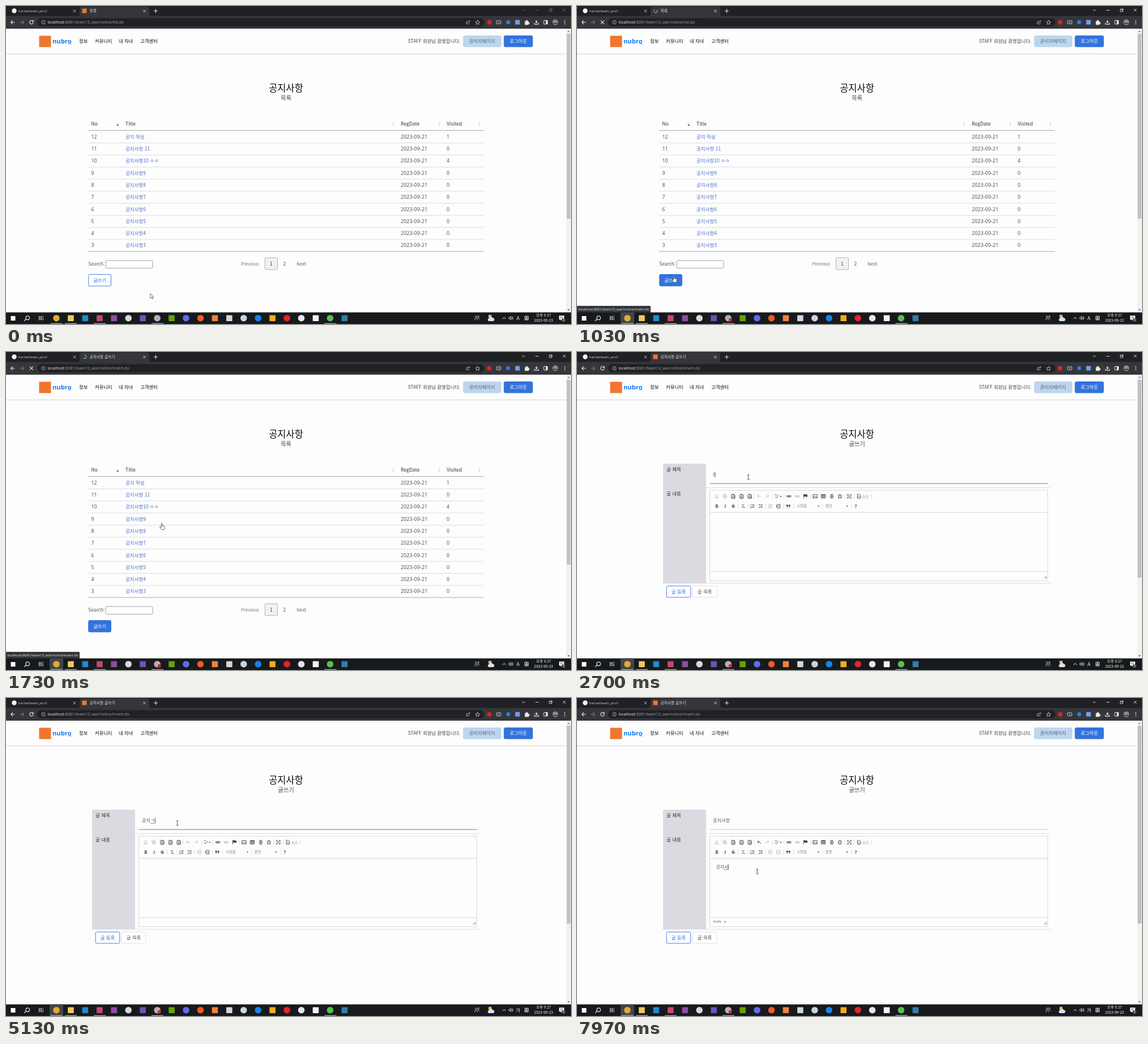
Write an HTML page that moves like this. It is 998 by 561 pixels and loops after 8000 ms.

```html
<!DOCTYPE html>
<html lang="ko">
<head>
<meta charset="utf-8">
<title>공지사항</title>
<style>
html, body { margin: 0; width: 100%; height: 100%; overflow: hidden; background: #fdfdfe; }
svg { display: block; width: 998px; height: 561px; }
text { font-family: 'Noto Sans CJK KR', 'Noto Sans', sans-serif; white-space: pre; }
.ui { font-family: 'Open Sans', 'Noto Sans CJK KR', sans-serif; }
.num { font-family: 'Noto Sans', sans-serif; }
</style>
</head>
<body>
<svg id="stage" viewBox="0 0 998 561"></svg>
<script>
const BLUE = '#3273dc', INK = '#474747', PALE = '#bdbdbd', BRAND = '#f0762f';
const LOOP = 8000;

// Drawing helpers
const rect = (x, y, w, h, fill, more = '') =>
  `<rect x="${x}" y="${y}" width="${w}" height="${h}" fill="${fill}" ${more}/>`;
const box = (x, y, w, h, stroke, fill = 'none', r = 0, more = '') =>
  rect(x, y, w, h, fill, `stroke="${stroke}" rx="${r}" ${more}`);
const disc = (x, y, r, fill) => `<circle cx="${x}" cy="${y}" r="${r}" fill="${fill}"/>`;
const rule = (x, y, w, color, h = 1) => rect(x, y, w, h, color);
const text = (x, y, s, size, fill = INK, more = '') =>
  `<text x="${x}" y="${y}" font-size="${size}" fill="${fill}" ${more}>${s}</text>`;
const mid = 'text-anchor="middle"';
const icon = (x, y, d, color = INK, width = 0.9, fill = 'none') =>
  `<path transform="translate(${x} ${y})" d="${d}" stroke="${color}" stroke-width="${width}" fill="${fill}"/>`;
const solid = (x, y, d, color) => icon(x, y, d, 'none', 0, color);
const group = (id, body) => `<g id="${id}">${body}</g>`;

const CROSS = 'M-2.4-2.4L2.4 2.4M2.4-2.4L-2.4 2.4';
const DOWN = 'M-1.8-.9h3.6l-1.8 2z';

function browser() {
  let s = rect(0, 0, 998, 18, '#202124') + rect(0, 17.5, 998, 22.5, '#35363a');
  s += `<path d="M126 18q4 0 4-4V5q0-4 4-4h115q4 0 4 4v9q0 4 4 4z" fill="#35363a"/>`;
  s += disc(14.5, 8.5, 4.2, '#f1f3f4');
  s += text(22, 10.8, 'harnel/team_pro3', 6, '#d5d7da', 'class="ui"');
  s += icon(121, 8.8, CROSS, '#d5d7da', 0.8) + icon(244.5, 8.8, CROSS, '#e8eaed', 0.8);
  s += icon(264.5, 8.8, 'M-3.5 0h7M0-3.5v7', '#e8eaed', 1);
  s += group('favicon', rect(134.5, 4.5, 8, 8, BRAND));
  s += group('spinner', icon(0, 0, 'M0-3a3 3 0 1 1-3 3', '#8ab4f8', 1));
  s += text(147.5, 11, '', 6.7, '#e8eaed', 'id="tab"');

  s += icon(12, 28.7, 'M3.6 0h-7M0-3.4l-3.4 3.4 3.4 3.4', '#e8eaed', 1.1);
  s += icon(28, 28.7, 'M-3.6 0h7M0-3.4l3.4 3.4-3.4 3.4', '#77797d', 1.1);
  s += group('reload', icon(45, 28.7, 'M2.6-1.8a3.2 3.2 0 1 0 .5 2.4M3.2-3.6v2.6h-2.6', '#e8eaed', 1.1));
  s += group('stop', icon(45, 28.7, 'M-3-3L3 3M3-3L-3 3', '#e8eaed', 1.1));
  s += rect(55, 21.5, 790, 14.5, '#202124', 'rx="7.2"');
  s += icon(66, 28.7, 'M-3.2 0a3.2 3.2 0 1 0 6.4 0a3.2 3.2 0 1 0-6.4 0M0-.5v2.3M0-1.9v.8', '#c0c3c7', 0.8);
  s += `<text class="ui" x="73.5" y="31.2" font-size="7" fill="#a0a4a9"><tspan fill="#f1f3f4">localhost</tspan><tspan id="url"></tspan></text>`;

  s += icon(816, 28.7, 'M-1-1h-2v4h5v-2M-1 1q0-3 4-3M1.4-3.8l2 1.8-2 1.8', '#c0c3c7', 0.8);
  s += icon(833, 28.9, 'M0-3.7l1.1 2.5 2.7.3-2 1.8.6 2.7-2.4-1.4-2.4 1.4.6-2.7-2-1.8 2.7-.3z', '#dadce0', 0.8);
  s += disc(853.5, 28.7, 3.9, '#e2231a');
  s += box(866.3, 26, 7.8, 5.4, '#dadce0', 'none', 1, 'stroke-width=".9"') + rule(869, 28.3, 2.5, '#dadce0');
  s += disc(887, 28.7, 3.6, '#2a7de1');
  s += rect(899.5, 24.7, 8, 8, '#6d9ff0');
  s += solid(920, 28.7, 'M-3.6-2h2.2a1.4 1.4 0 1 1 2.6 0h2v2.2a1.3 1.3 0 1 1 0 2.4v2h-6.8z', '#e8eaed');
  s += icon(937, 28.7, 'M0-3.8v4.4M-2-1.2l2 2 2-2M-3.6 1.3v2.1h7.2v-2.1', '#e8eaed', 1.1);
  s += box(949.9, 25.5, 6.6, 6.4, '#e8eaed', 'none', 0.6) + rect(953.6, 25.5, 3, 6.4, '#e8eaed');
  s += disc(970.3, 28.7, 5, '#8c8f94') + rect(966, 29.5, 8.6, 2.2, '#44474b', 'rx="1"');
  for (const y of [25.8, 28.7, 31.6]) s += disc(987, y, 0.85, '#e8eaed');

  s += group('controls',
    icon(914, 7.3, 'M-2.6-1.2l2.6 2.6 2.6-2.6', '#fff', 0.8) +
    icon(938, 7.5, 'M-2.8 0h5.6', '#fff', 0.8) +
    icon(962, 7.5, 'M-2.5-1.3h3.8v3.8h-3.8zM-1.3-1.3v-1.2h3.8v3.8h-1.2', '#fff', 0.7) +
    icon(986, 7.3, CROSS, '#fff', 0.8));
  return s;
}

function siteHeader() {
  let s = rect(58.5, 52.5, 21, 20, BRAND);
  s += text(82, 65.8, 'nubro', 11.2, '#1279f2', 'class="num" font-weight="800"');
  s += text(109.5, 67.8, 'edu', 3.4, '#1279f2');
  [[129, '정보'], [157, '커뮤니티'], [199, '내 자녀'], [237.3, '고객센터']]
    .forEach(([x, w]) => s += text(x, 65.2, w, 8.3, '#111', 'font-weight="500"'));
  s += text(802.5, 65.2, 'STAFF 회원님 환영합니다.', 8.4, '#444', 'text-anchor="end"');
  s += rect(807.3, 52, 67.5, 20.6, '#bdd6ee', 'rx="3"') + text(841, 65.3, '관리자페이지', 8.3, '#5c6670', mid);
  s += rect(879.3, 52, 51.3, 20.6, BLUE, 'rx="3"') + text(905, 65.3, '로그아웃', 8.3, '#fff', mid + ' font-weight="500"');
  s += rule(0, 84, 989.5, '#d3d3d7');
  s += text(494.5, 150.5, '공지사항', 16.5, '#0a0a0a', mid + ' font-weight="500"');
  s += text(494.5, 166, '', 10.4, '#4a4a4a', mid + ' id="sub"');
  return s;
}

function listPage() {
  let s = '';
  [[150.5, 'No'], [211, 'Title'], [697.3, 'RegDate'], [778.5, 'Visited']]
    .forEach(([x, w]) => s += text(x, 211.2, w, 8.6, '#333', 'font-weight="500"'));
  [197.3, 684, 765, 836].forEach((x, i) => {
    s += solid(x, 206.3, 'M-2 1h4l-2-2.6z', '#d9d9de');
    s += solid(x, 209.6, 'M-2.2-.6h4.4l-2.2 3z', i ? '#d9d9de' : '#555');
  });
  s += rule(145, 219, 699, '#a8a8a8');
  const special = { 12: '공지 작성', 11: '공지사항 11', 10: '공지사항10 ㅇㅇ' };
  const visits = { 12: 1, 10: 4 };
  for (let i = 0; i < 10; i++) {
    const n = 12 - i, y = 233.7 + i * 21.3;
    s += text(150.5, y, n, 8.8, '#555', 'class="num"');
    s += text(211, y, special[n] || '공지사항' + n, 8.5, '#4a70c6');
    s += text(697.3, y, '2023-09-21', 9, '#555', 'class="num"');
    s += text(778.3, y, visits[n] || 0, 8.8, '#555', 'class="num"');
    if (i < 9) s += rule(145, 241 + i * 21.3, 699, '#dcdce0');
  }
  s += rule(145, 432.5, 699, '#a8a8a8');
  s += text(145.3, 458, 'Search:', 8.3, '#555') + box(176.2, 449, 82.8, 13.5, '#8a8a8a', '#fff', 1.5, 'stroke-width=".8"');
  s += text(415, 457.6, 'Previous', 8, '#777');
  s += box(457.5, 444, 22, 21, '#b4b4b8', '#f1f1f4', 1);
  s += text(468.4, 457.6, '1', 8.6, '#444', mid) + text(492, 457.6, '2', 8.6, '#555', mid);
  s += text(513.3, 457.6, 'Next', 8, '#666');
  s += box(145.7, 473.5, 39.8, 20.5, BLUE, '#fff', 2, 'id="write" stroke-width=".9"');
  s += text(165.6, 486.8, '글쓰기', 8.3, BLUE, mid + ' id="writeText"');
  return s;
}

function toolbar() {
  const paste = 'M-3-2.8h6v6.2h-6zM-1.5-3.6h3M-.8-.4h3.8v3.8h-3.8z';
  const link = 'M-3.5-1.3h7v2.6h-7zM-1.7 0h3.4';
  const lines = 'M-.8-2.4h4.2M-.8 0h4.2M-.8 2.4h4.2';
  const dent = 'M-3.5-3h7M0-1h3.5M0 1h3.5M-3.5 3h7';
  const top = 254.5, low = 272;
  let s = '';
  [[246.7, 'M-2.5-3.5L2 2M2.5-3.5L-2 2M-3 2.6a1 1 0 1 0 2 0a1 1 0 1 0-2 0M1 2.6a1 1 0 1 0 2 0a1 1 0 1 0-2 0', PALE],
   [261, 'M-3-3.5h4v5h-4zM-1-1.5h4v5h-4z', PALE],
   [275.8, paste], [290.4, paste], [305, paste],
   [336, 'M-3 2.5q1-4 5.5-3M.5-2.8l2.5 2.3-3 1.8', PALE],
   [353, 'M-3 .6l2 2.3 4.2-5M-3.6-2.5h4'],
   [374.3, link], [389, link, PALE],
   [420.5, 'M-3.7-3h7.4v6h-7.4zM-3 2.2l2-3 2 2 1-1 1.5 2'],
   [435, 'M-3.7-3h7.4v6h-7.4zM-3.7-2.2h7.4M-3.7.5h7.4M-1.2-3v6M1.3-3v6'],
   [450, 'M-2.5-3.3h5M-2.5-1.7h5M-3.6 0h7.2M-2.5 1.7h5M-2.5 3.3h5'],
   [481, CROSS + 'M-3.3-1v-2.3h2.3M1-3.3h2.3v2.3M3.3 1v2.3h-2.3M-1 3.3h-2.3v-2.3'],
   [498, 'M-2.7-3.5h3.5l2 2v5h-5.5zM-.6-.2l-1 1 1 1M.8-.2l1 1-1 1']
  ].forEach(([x, d, c]) => s += icon(x, top, d, c));
  s += group('undo', icon(321.6, top, 'M3 2.5q-1-4-5.5-3M-.5-2.8l-2.5 2.3 3 1.8', 'currentColor', 1));
  s += icon(403.5, top, 'M-3-3.5v7.2', INK) + solid(403.5, top, 'M-3-3.3q2-.8 3.3 0t3.2 0v4q-1.8.8-3.2 0t-3.3 0z', INK);
  s += text(464.4, 257.7, 'Ω', 8.6, INK, mid + ' font-weight="700"') + text(504, 256.9, '소스', 6.2, '#777');
  s += solid(360, 255, DOWN, INK);

  s += group('hover', box(302.5, 265.2, 14.4, 13.3, '#c4c4c8', '#e4e4e6', 0, 'stroke-width=".9"'));
  const bold = mid + ' font-weight="700"';
  s += text(247, 275, 'B', 8, INK, bold) + text(261, 275, 'I', 8, INK, bold + ' font-style="italic"');
  s += text(276, 275, 'S', 8, INK, bold) + rule(272.5, 271.8, 7, INK, 0.8);
  s += text(292, 275, 'T', 8, INK, mid + ' font-style="italic"') + icon(294.9, 274, 'M-1.3-1.3l2.6 2.6M1.3-1.3l-2.6 2.6', INK, 0.8);
  s += icon(310, low, lines + 'M-2.8-3.3v2.3M-3.4 1h1.3l-1.3 2h1.5');
  s += icon(324.4, low, lines) + rect(321, 268.8, 1.7, 1.7, INK) + rect(321, 273.5, 1.7, 1.7, INK);
  s += icon(341.5, low, dent + 'M-1.6-1.5l-2 1.5 2 1.5z', PALE);
  s += group('indent', icon(356, low, dent + 'M-3.5-1.5l2 1.5-2 1.5z', 'currentColor'));
  for (const x of [371, 375]) s += solid(x, low, 'M-1.5-2.5h3v2.8q0 2-2.2 2.4v-1q1-.4 1-1.6h-1.8z', INK);
  s += text(388.3, 274.3, '스타일', 6.4, '#777') + text(439, 274.3, '', 6.4, '#777', 'id="format"');
  s += solid(426.5, 272.2, DOWN, INK) + solid(477, 272.2, DOWN, INK);
  s += text(492.3, 275, '?', 8.4, INK, bold);

  const bars = (xs, y) => xs.forEach(x => s += rect(x, y, 0.8, 9, '#d6d6da'));
  bars([312.3, 345, 365.3, 412, 473, 489.3, 519.3], 250);
  bars([284, 301.3, 333, 364.5, 382, 433, 484], 267.5);
  return s;
}

function formPage() {
  let s = rect(152, 197, 76, 211, '#dadae0');
  s += text(158, 210.3, '글 제목', 8.5, '#333') + text(158, 253, '글 내용', 8.5, '#333');
  s += rule(228, 238.7, 609, '#dedee2') + rule(152, 407.5, 685, '#dedee2');
  s += rect(235, 231.5, 597, 1, '#c9c9ce', 'id="line"');
  s += box(234.5, 244, 597, 159.5, '#d4d4d8', '#fdfdfe', 0, 'stroke-width=".9"');
  s += rule(235, 282.5, 596, '#d4d4d8') + rule(235, 386.8, 596, '#d4d4d8');
  s += solid(827, 397, 'M2.5-2.5v5h-5z', '#b5b5b9');
  s += toolbar();
  s += text(241, 396.2, 'body   p', 6, '#555', 'class="ui" id="path"');
  s += box(158.2, 412.8, 42.6, 20, BLUE, '#fff', 2, 'stroke-width=".9"') + text(179.5, 425.8, '글 등록', 8.4, BLUE, mid);
  s += box(204.2, 412.8, 42.8, 20, '#dedee2', '#fff', 2, 'stroke-width=".9"') + text(225.6, 425.8, '글 목록', 8.4, '#555', mid);
  for (const [id, x, y, size] of [['title', 240, 219, 8.2], ['body', 245.7, 301, 7.6]]) {
    s += text(x, y, '', size, '#555', `id="${id}"`);
    s += rect(x, y + 1.7, size * 0.92, 0.7, '#555', `id="${id}Under"`);
    s += rect(x, y - 7.5, 0.8, 9.5, '#222', `id="${id}Caret"`);
  }
  return s;
}

function taskbar() {
  let s = rect(0, 540.5, 998, 20.5, '#171a1d');
  s += rect(77, 540.5, 24, 20.5, '#41464a', 'id="active"');
  s += rect(8.5, 547, 8, 8, '#fff');
  s += icon(37.5, 550.5, 'M-2.2 1.4a3.4 3.4 0 1 1 1.6 1.4zM-2.2 1.8l-3 3.2', '#fff', 1.1);
  s += icon(62, 550.5, 'M-3.8-3.8v1.5h5v-1.5M-3.8-1.2h5v2.6h-5zM-3.8 4v-1.5h5v1.5M3.5-4v2M3.5-.8v4.8', '#e0e0e0', 0.8);
  const apps = ['o#e5a832', 's#f2c75c', 's#2489ca', 's#c8456f', 's#8a4fa0', 'o#d8d8d8', 's#6a55b5', 'o#aeb2b6',
    's#65a300', 'o#5c6df0', 'o#ee5a24', 's#f1803c', 's#d6d6d6', 'o#c7d5e0', 'o#1684e8', 's#f5ad18',
    'o#e5222e', 'o#e9e4ec', 's#f2f2f2', 'o#58c04c', 's#2f7fa8'];
  apps.forEach((a, i) => {
    const x = 89 + i * 25.45, c = a.slice(1);
    s += a[0] === 'o' ? disc(x, 550.7, 5.8, c) : rect(x - 5.3, 545.4, 10.6, 10.6, c, 'rx=".8"');
  });
  for (const x of [78.5, 104, 155, 257, 562.5]) s += rule(x, 559.5, 21, '#3fb8c4', 1.5);
  s += disc(270.8, 553.8, 3, '#ec1c24').replace('<circle', '<circle id="rec"');

  s += icon(832, 550.5, 'M-1.6-1a1.4 1.4 0 1 0-.1 0M-4 4q.2-4 2.4-4t2.4 4M2.4-1.6a1.3 1.3 0 1 0-.1 0M1.2-.3q2.4-1 3 2.3', '#e8e8e8', 0.8);
  s += disc(855, 547.5, 3, '#f3b64b') + solid(857, 552, 'M-4 4a2.7 2.7 0 0 1 0-5.2a4 4 0 0 1 7-.6a3 3 0 0 1 .6 5.8z', '#cfe2f5');
  s += icon(880, 550.7, 'M-2.8 1.5l2.8-3 2.8 3', '#fff', 0.9);
  s += icon(892, 550.5, 'M-3.8-1.2h1.5l2-2v6.4l-2-2h-1.5zM1.2-1.5q1 1.5 0 3M2.6-2.8q2 2.8 0 5.6', '#fff', 0.8);
  s += text(904.3, 553.7, '', 8.5, '#fff', mid + ' id="ime"');
  s += icon(919.5, 550.5, 'M-3-3.3h6v6.6h-6zM-1.5-1.6h3M0-3v3.4M-3 .6h6M-1 .6v2.5M1 .6v2.5', '#fff', 0.8);
  s += text(949.5, 547.7, '오후 9:27', 6.4, '#fff', mid) + text(949.5, 557.2, '2023-09-23', 6.5, '#fff', mid);
  s += solid(981.5, 550.3, 'M-4.5-4h9v7h-4l-2 2v-2h-3z', '#fff') + icon(981.5, 550.3, 'M-3-2h6M-3 0h4', '#333', 0.7);
  s += disc(985, 554, 3.6, '#3a3d40') + text(985, 556.3, '5', 6, '#fff', mid);
  return s;
}

const cursors =
  group('arrow', icon(0, 0, 'M0 0v8.6l2-1.8 1.3 3 1.4-.6-1.3-2.9h2.6z', '#222', 0.6, '#fff')) +
  group('hand', icon(0, 0, 'M-.9.8a.9.9 0 0 1 1.8 0v3.4l3 .6q1.3.3 1.2 1.6l-.6 3.2q-.2 1.6-1.5 1.6h-2.6q-.9 0-1.4-.8l-2.6-3.7q-.4-1 .7-1.2l2 1.5z', '#222', 0.7, '#fff')) +
  group('beam', icon(0, 0, 'M-2-4h1.2q.8 0 .8.8v6.4q0 .8-.8.8h-1.2M2-4h-1.2q-.8 0-.8.8M2 4h-1.2q-.8 0-.8-.8', '#222', 0.8));

document.getElementById('stage').innerHTML =
  rect(0, 0, 998, 561, '#fdfdfe') + siteHeader() + group('list', listPage()) + group('form', formPage()) +
  rect(989.5, 40, 8.5, 501, '#f1f1f2') + rect(990.5, 49, 6.5, 326, '#c1c1c4', 'id="thumb"') +
  solid(993.7, 44.7, 'M-2 1h4l-2-2.4z', '#777') + solid(993.7, 536, 'M-2-1h4l-2 2.4z', '#555') +
  browser() +
  group('status', rect(-1, 529, 131, 12, '#35363a', 'rx="1"') +
    text(2.5, 537.3, 'localhost:8081/team13_war/notice/insert.do', 6.08, '#e8eaed', 'class="ui"')) +
  taskbar() + group('mouse', cursors);

const el = {};
document.querySelectorAll('[id]').forEach(e => el[e.id] = e);
const show = (id, on) => el[id].setAttribute('display', on ? 'inline' : 'none');
const set = (id, name, value) => el[id].setAttribute(name, value);
const write = (id, s) => { if (el[id].textContent !== s) el[id].textContent = s; };

// Moments of the story, in ms
const RECORD = 60, CLICK = 950, COMMIT = 1300, LOADED = 1900, FOCUS = 2200, IME = 3650, EDIT = 6900;

// Typed states: time, text, whether the last letter is still composing
const titleKeys = [[FOCUS, '', 0], [2600, 'r', 0], [3400, '', 0], [3850, 'ㄱ', 1], [4000, '고', 1], [4150, '공', 1],
  [4400, '공ㅈ', 1], [4550, '공지', 1], [5000, '공지ㄱ', 1], [5300, '공지', 0], [5450, '공지ㅅ', 1], [5580, '공지사', 1],
  [5720, '공지샇', 1], [5820, '공지사하', 1], [5950, '공지사항', 1]];
const bodyKeys = [[EDIT, '', 0], [7200, 'ㄱ', 1], [7300, '고', 1], [7400, '공', 1], [7520, '공ㅈ', 1],
  [7620, '공지', 1], [7710, '공짓', 1], [7800, '공지사', 1]];
const path = [[0, 255, 507], [130, 255, 507], [560, 170, 478.5], [1000, 170, 478.5], [1430, 258.5, 352.5],
  [1500, 258.5, 352.5], [2050, 302.7, 220.7], [6150, 302.7, 220.7], [6560, 304, 282], [6620, 304, 282], [6820, 318.3, 306], [LOOP, 318.3, 306]];

function mouseAt(t) {
  const i = path.findIndex(p => p[0] > t);
  const [t0, x0, y0] = path[i - 1], [t1, x1, y1] = path[i];
  const u = (t - t0) / (t1 - t0), k = u * u * (3 - 2 * u);
  return [x0 + (x1 - x0) * k, y0 + (y1 - y0) * k];
}

function typeInto(id, keys, t, focused) {
  const [at, s, composing] = keys.filter(k => k[0] <= t).pop() || [0, '', 0];
  write(id, s);
  const start = +el[id].getAttribute('x'), size = +el[id].getAttribute('font-size');
  const end = start + (s && focused ? el[id].getComputedTextLength() : 0);
  set(id + 'Under', 'x', end - size * 0.92);
  set(id + 'Caret', 'x', end + 0.2);
  show(id + 'Under', focused && composing);
  show(id + 'Caret', focused && (t - at) % 1060 < 530);
}

function draw(t) {
  const form = t >= LOADED, clicked = t >= CLICK, committed = t >= COMMIT, editing = t >= EDIT;
  const loading = clicked && !form;
  show('list', !form);
  show('form', form);
  show('status', loading);
  show('stop', loading);
  show('reload', !loading);
  show('spinner', loading);
  show('favicon', !loading);
  set('spinner', 'transform', `translate(139 8.7) rotate(${t * 0.4})`);
  set('controls', 'opacity', clicked ? 1 : 0.4);
  show('active', clicked);
  show('rec', t >= RECORD);
  write('tab', committed ? '공지사항 글쓰기' : '목록');
  write('url', `:8081/team13_war/notice/${committed ? 'insert' : 'list'}.do`);
  write('sub', form ? '글쓰기' : '목록');
  write('ime', t < IME ? 'A' : '가');
  set('thumb', 'height', form ? 349 : 326);

  const [x, y] = mouseAt(t);
  const onButton = x < 186 && y > 473 && y < 495;
  const hand = !form && (onButton || y < 433);
  const beam = form && (y < 236 || y > 286);
  set('mouse', 'transform', `translate(${x} ${y})`);
  show('hand', hand);
  show('beam', beam);
  show('arrow', !hand && !beam);
  set('write', 'fill', clicked ? BLUE : onButton ? '#d3e1f8' : '#fff');
  set('writeText', 'fill', clicked ? '#fff' : BLUE);

  const inTitle = t >= FOCUS && !editing;
  set('line', 'fill', inTitle ? '#7d6f9c' : '#c9c9ce');
  show('hover', form && y > 265 && y < 284);
  show('path', editing);
  write('format', editing ? '본문' : '문단');
  set('undo', 'color', t >= bodyKeys[1][0] ? INK : PALE);
  set('indent', 'color', editing ? PALE : INK);
  typeInto('title', titleKeys, t, inTitle);
  typeInto('body', bodyKeys, t, editing);
}

function frame() {
  draw(performance.now() % LOOP);
  requestAnimationFrame(frame);
}
frame();
</script>
</body>
</html>
```
